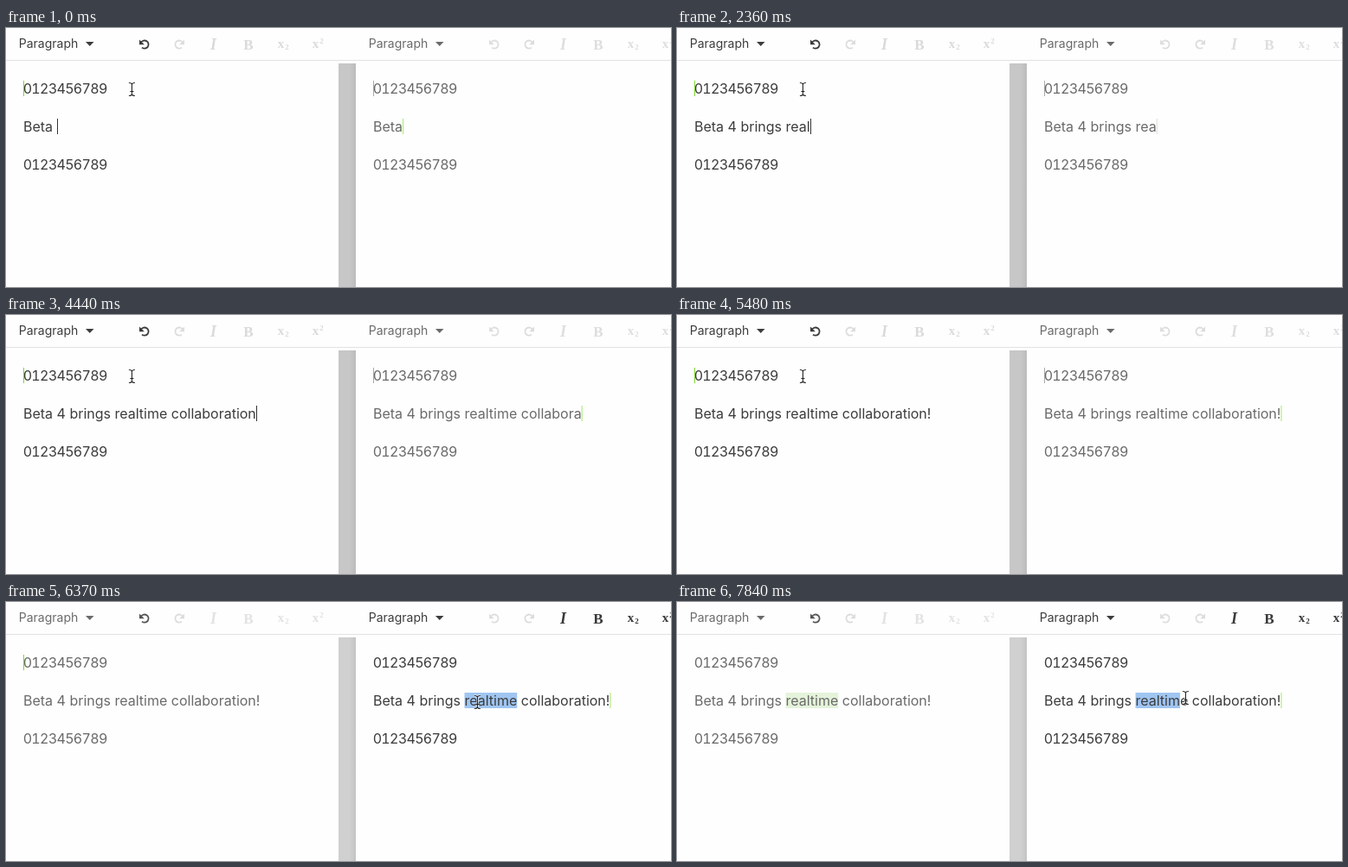
An HTML page that plays this animation: 768x300 px, repeating every 7990 ms.

```html
<!DOCTYPE html>
<html lang="en">
<head>
<meta charset="utf-8">
<title>Shared editing</title>
<style>
  html, body { margin: 0; width: 100%; height: 100%; overflow: hidden; background: #fefefe; }
  svg { display: block; width: 768px; height: 300px; }
  text { white-space: pre; font: 16px Inter, sans-serif; }
  .style { font-size: 14px; }
  .digits { font-variant-numeric: tabular-nums; text-anchor: middle; }
  .serif { font: bold 17px "Liberation Serif", serif; text-anchor: middle; }
</style>
</head>
<body>
<svg id="stage" viewBox="0 0 768 300"></svg>
<script>
const LOOP = 7990, TICKS = 54;
const LINE = "Beta 4 brings realtime collaboration!";
const DIGITS = "0123456789", DIGIT_STEP = 9.7;
const WORD = LINE.indexOf("realtime"), WORD_END = WORD + 8;
const FOCUS = 42, SELECT = 43, SYNC = 46, SHRINK = 53;

// Keyframes: [tick, value, ...]
const TYPED = [
  [[0, 5], [2, 6], [4, 7], [8, 13], [10, 14], [12, 15], [16, 18], [18, 19], [25, 27], [30, 36], [32, 37]],
  [[0, 4], [2, 5], [4, 5], [8, 9], [10, 13], [12, 14], [16, 17], [18, 18], [25, 24], [30, 32], [32, 33], [35, 37]]
];
const POINTER = [[0, 145.4, 71], [37, 145.4, 71], [38, 200, 78], [40, 450, 108], [42, 544.4, 116],
  [44, 544.4, 116], [45, 578, 115], [46, 611, 113], [48, 611, 113], [53, 587.4, 111]];

const stage = document.getElementById("stage");
const pen = document.createElement("canvas").getContext("2d");
pen.font = "16px Inter, sans-serif";
const widthOf = n => pen.measureText(LINE.slice(0, n)).width;

function add(parent, tag, attrs = {}, content = "") {
  const el = document.createElementNS("http://www.w3.org/2000/svg", tag);
  set(el, attrs);
  el.textContent = content;
  return parent.appendChild(el);
}
function set(el, attrs) {
  for (const key in attrs) el.setAttribute(key, attrs[key]);
}
function show(el, on) {
  el.style.display = on ? "" : "none";
}
function sample(keys, tick) {
  let i = 0;
  while (i < keys.length - 2 && tick >= keys[i + 1][0]) i++;
  const [a, b] = [keys[i], keys[i + 1]];
  const p = Math.min(1, (tick - a[0]) / (b[0] - a[0]));
  return a.slice(1).map((v, j) => v + (b[j + 1] - v) * p);
}

function arrow(parent, x, flip) {
  const g = add(parent, "g", { transform: `translate(${x} 19) scale(${flip ? -1 : 1} 1)` });
  add(g, "path", { d: "M-4-2.2A4.6 4.6 0 1 1-3 3.6", fill: "none", stroke: "currentColor", "stroke-width": 1.8 });
  add(g, "path", { d: "M-6-5.5V.2H-.2Z", fill: "currentColor" });
  return g;
}
function script(parent, x, y) {
  const g = add(parent, "g", { fill: "currentColor" });
  add(g, "text", { class: "serif", x: x - 2.5, y: 23, style: "font-size:15px" }, "x");
  add(g, "text", { class: "serif", x: x + 4.5, y, style: "font-size:9px" }, "2");
  return g;
}
function caret(parent, y, color) {
  return add(parent, "rect", { x: 20, y, width: 1, height: 18, fill: color });
}
function digits(parent, y) {
  const x = [...DIGITS].map((_, i) => 20 + DIGIT_STEP * (i + 0.5)).join(" ");
  return add(parent, "text", { class: "digits", x, y }, DIGITS);
}

function makePane(x) {
  const g = add(stage, "g", { transform: `translate(${x} 0)` });
  const pane = { mark: add(g, "rect", { y: 105, height: 18 }) };
  pane.inks = [
    add(g, "text", { class: "style", x: 14.8, y: 23 }, "Paragraph"),
    add(g, "path", { d: "M92 16h9.5l-4.75 5z" }),
    digits(g, 76),
    add(g, "text", { x: 20, y: 120 }),
    digits(g, 164)
  ];
  pane.line = pane.inks[3];
  pane.undo = arrow(g, 160, false);
  pane.redo = arrow(g, 200, true);
  pane.tools = [
    add(g, "text", { class: "serif", x: 239.5, y: 24.5, fill: "currentColor", style: "font-style:italic;font-size:18px" }, "I"),
    add(g, "text", { class: "serif", x: 280, y: 24.5, fill: "currentColor" }, "B"),
    script(g, 320, 25),
    script(g, 360, 18)
  ];
  pane.top = caret(g, 61, x ? "#a8a8a8" : "#7fd636");
  pane.caret = caret(g, 105, x ? "#a4e86c" : "#333");
  return pane;
}

const fade = add(add(stage, "defs"), "linearGradient", { id: "edge" });
add(fade, "stop", { offset: 0, "stop-opacity": 0 });
add(fade, "stop", { offset: 1, "stop-opacity": 0.06 });
add(stage, "rect", { width: 768, height: 300, fill: "#fefefe" });
add(stage, "rect", { y: 37, width: 768, height: 1, fill: "#e3e3e3" });
const bar = add(stage, "rect", { x: 384, y: 41, width: 20, height: 259 });
add(stage, "rect", { x: 397, y: 41, width: 7, height: 259, fill: "url(#edge)" });
const left = makePane(0), right = makePane(404);
const pointer = add(stage, "g", { fill: "none" });
for (const [stroke, width] of [["#fff", 3], ["#222", 1.1]]) {
  add(pointer, "path", { d: "M-3.5-7.5Q-.5-7.5 0-6Q.5-7.5 3.5-7.5M0-6V6M-3.5 7.5Q-.5 7.5 0 6Q.5 7.5 3.5 7.5M-2 2.5H2",
    stroke, "stroke-width": width, "stroke-opacity": width > 2 ? 0.5 : 1 });
}

function paint(pane, focused, typed, undo, tools) {
  const ink = focused ? "#3c3c3c" : "#6a6a6a";
  pane.inks.forEach(el => set(el, { fill: ink }));
  pane.undo.style.color = undo;
  pane.redo.style.color = "#dcdcdc";
  pane.tools.forEach(el => el.style.color = tools);
  pane.line.textContent = LINE.slice(0, typed);
}
function mark(pane, on, end, fill) {
  const x = widthOf(WORD);
  show(pane.mark, on);
  set(pane.mark, { x: 20 + x, width: widthOf(end) - x, fill });
}

function render(ms) {
  const tick = Math.min(TICKS - 1, Math.floor(ms / LOOP * TICKS + 0.05));
  const [nLeft, nRight] = TYPED.map(keys => Math.floor(sample(keys, tick)[0] + 1e-6));
  const moved = tick >= FOCUS;

  paint(left, !moved, nLeft, moved ? "#555" : "#3a3a3a", moved ? "#e2e2e2" : "#dadada");
  paint(right, moved, nRight, "#dedede", moved ? "#3a3a3a" : "#dedede");
  set(bar, { fill: moved ? "#d0d0d0" : "#c7c7c7" });

  show(left.caret, tick < 37);
  show(left.top, tick < SYNC);
  show(right.top, !moved);
  set(left.caret, { x: 20 + Math.round(widthOf(nLeft)) });
  set(right.caret, {
    x: 20 + widthOf(nRight),
    fill: tick === 16 || tick === 17 ? "#d6dfd0" : "#a4e86c"
  });
  mark(left, tick >= SYNC, WORD_END, "#e4f3da");
  mark(right, tick >= SELECT, tick >= SHRINK ? WORD_END - 1 : WORD_END, "#9fc5f1");

  const [x, y] = sample(POINTER, tick);
  set(pointer, { transform: `translate(${x} ${y})` });
}

const start = performance.now();
function loop() {
  render((performance.now() - start) % LOOP);
  requestAnimationFrame(loop);
}
loop();
</script>
</body>
</html>
```
